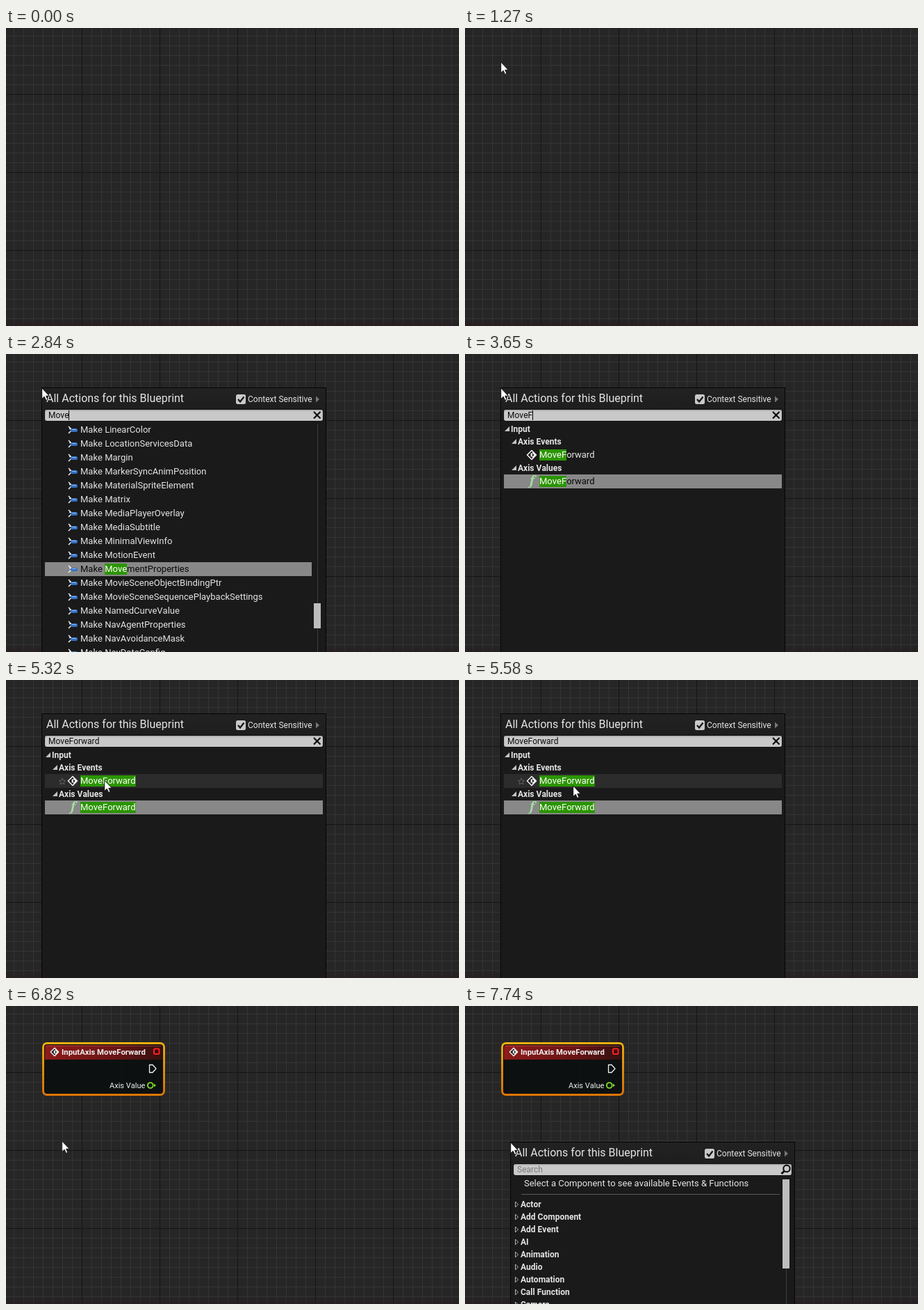
Recreate the animation shown at these times as an HTML page without scripts. Size 652 by 428 pixels, loop 8 s.

```html
<!DOCTYPE html>
<html lang="en">
<head>
<meta charset="utf-8">
<title>Adding an input node</title>
<style>
html, body { margin: 0; width: 652px; height: 428px; overflow: hidden; }
body {
  position: relative;
  font: 13px/20px Roboto, sans-serif;
  font-kerning: none;
  color: #e4e4e4;
  white-space: pre;
  background:
    linear-gradient(transparent 417px, rgba(40, 26, 32, .55)),
    linear-gradient(#151515 1px, transparent 1px) 0 95px / 112px 112px,
    linear-gradient(90deg, #151515 1px, transparent 1px) 109px 0 / 112px 112px,
    linear-gradient(#343434 1px, transparent 1px) 0 11px / 14px 14px,
    linear-gradient(90deg, #343434 1px, transparent 1px) 11px 0 / 14px 14px,
    #262626;
}
div, svg, .at { position: absolute; left: 0; top: 0; }
svg { width: 652px; height: 600px; overflow: visible; }
p { margin: 0; position: relative; }
.bold { font-weight: 700; font-size: 12px; }
.small { font-size: 12px; }

/* menu */
.menu { width: 652px; height: 600px; animation: menu 8s step-end infinite; }
.panel {
  left: 51px; top: 48px; width: 408px; height: 430px;
  border: 1px solid #050505;
  background: linear-gradient(#222, #1e1e1e 30px, #1a1a1a 52px);
}
.field {
  left: 56px; top: 80px; width: 400px; height: 16px;
  border-radius: 3px; background: #c9c9c9;
  box-shadow: 0 0 0 1px #111, inset 0 1px 2px #999;
}
.start, .typed, .make, .found { width: 652px; height: 600px; }
.start { animation: start 8s step-end infinite; }
.typed { animation: typed 8s step-end infinite; }
.make { animation: make 8s step-end infinite; }
.found { animation: found 8s step-end infinite; }
.cats { left: 66px; top: 129px; line-height: 18px; }
.rows { left: 56px; top: 99px; width: 333px; padding-left: 51px; }
.rows .sel { margin-left: -51px; padding-left: 51px; background: #888; color: #080808; }
.sel.wide, .hover { left: 56px; top: 173px; width: 400px; height: 20px; background: #888; }
.hover { top: 135px; background: #2c2c2c; animation: hover 8s step-end infinite; }
.word { position: relative; }

/* typed text: one set of widths in em drives the field and the match marks */
.input, .hit {
  position: absolute; left: 0; top: 0; height: 20px;
  overflow: hidden; font-style: normal;
  animation: type 8s step-end infinite;
}
.input {
  left: 61px; top: 81px; height: 14px; line-height: 14px;
  font-size: 12px; color: #0a0a0a; border-right: 1px solid #000;
  animation-name: type, blink;
}
.hit { background: #2b9500; color: #fff; clip-path: inset(2px 0 2px); }
.hit.mo { animation-name: type, mo; }
.hit.mov { animation-name: type, mov; }
mark { background: #2b9500; color: #fff; animation: mark 8s step-end infinite; }

.node { transform-origin: 140px 90px; animation: spawn 8s ease-out infinite; }
.node text { fill: #f0f0f0; }
.cursor { width: 12px; height: 19px; animation: show 8s step-end infinite, move 8s linear infinite; }

@keyframes menu {
  0%, 72.875% { opacity: 0; transform: none; }
  22.875% { opacity: 1; transform: none; }
  96.75% { opacity: 1; transform: translate(14px, 147px); }
}
@keyframes start { 0%, 96.75% { opacity: 1; } 31.75% { opacity: 0; } }
@keyframes typed { 0%, 96.75% { opacity: 0; } 31.75% { opacity: 1; } }
@keyframes make { 0%, 44.5% { opacity: 0; } 31.75% { opacity: 1; } }
@keyframes found { 0%, 96.75% { opacity: 0; } 44.5% { opacity: 1; } }
@keyframes hover { 0% { opacity: 0; } 66.25% { opacity: 1; } }
@keyframes mark {
  0% { background: #2b9500; color: #fff; }
  33.375% { background: transparent; color: inherit; }
}
@keyframes mo { 0% { opacity: 1; } 34.375% { opacity: 0; } }
@keyframes mov { 0% { opacity: 1; } 35.5% { opacity: 0; } }
@keyframes blink {
  0%, 44.5% { border-color: #000; }
  39%, 60.75% { border-color: transparent; }
}
@keyframes type {
  0% { width: 0; }
  31.75% { width: .873em; }
  33.375% { width: 1.443em; }
  34.375% { width: 1.928em; }
  35.5% { width: 2.458em; }
  44.5% { width: 3.011em; }
  47.875% { width: 3.581em; }
  49.375% { width: 3.919em; }
  51.625% { width: 4.67em; }
  53.25% { width: 5.214em; }
  55% { width: 5.552em; }
  58.5% { width: 6.13em; }
}
@keyframes spawn {
  0%, 75.87% { opacity: 0; transform: scale(.3); }
  75.88% { opacity: .3; transform: scale(.4); }
  78.875%, 100% { opacity: 1; transform: none; }
}
@keyframes show { 0% { opacity: 0; } 10.5% { opacity: 1; } }
@keyframes move {
  0%, 10.5% { transform: translate(25px, 64px); }
  11.5%, 13.25% { transform: translate(68px, 60px); }
  15.875%, 64.7% { transform: translate(51px, 48px); }
  66.5% { transform: translate(141px, 143px); }
  69.75%, 83.2% { transform: translate(155px, 151px); }
  86%, 88.25% { transform: translate(53px, 208px); }
  90.625%, 100% { transform: translate(65px, 195px); }
}
</style>
</head>
<body>

<svg>
  <defs>
    <linearGradient id="rim" x2="0" y2="1">
      <stop stop-color="#f2b010"/><stop offset="1" stop-color="#dd7606"/>
    </linearGradient>
    <linearGradient id="head">
      <stop stop-color="#8e1b1b"/><stop offset=".6" stop-color="#6a1414"/><stop offset="1" stop-color="#331010"/>
    </linearGradient>
    <pattern id="pill" patternUnits="userSpaceOnUse" x="89" y="99" width="16" height="20">
      <path d="M1 5l4 4M1 15l4-4M2 8.500h3" stroke="#eee" stroke-width="1.500"/>
      <rect x="4" y="8" width="10" height="5" rx="2.500" fill="#3472c6"/>
      <path d="M6 9.500h6" stroke="#8fb9f0"/>
    </pattern>
    <pattern id="fold" patternUnits="userSpaceOnUse" x="57" y="129" width="8" height="18">
      <path d="M1.500 5v8l4-4z" fill="none" stroke="#b4b4b4"/>
    </pattern>
    <g id="event">
      <path d="M0-6.500L6.500 0 0 6.500-6.500 0z" fill="#111" stroke="#f2f2f2" stroke-width="1.600" stroke-linejoin="round"/>
      <path d="M1-5L6 0 1 5V2.500H-1.500v-5H1z" fill="#f2f2f2"/>
      <path d="M1-2.500L3.500 0 1 2.500z" fill="#111"/>
    </g>
    <path id="open" d="M7 0v7H0z" fill="#c4c4c4"/>
  </defs>

  <g class="node">
    <rect x="55" y="55" width="171" height="72" rx="5" fill="#0c0f0f" fill-opacity=".9"/>
    <path d="M56 77V60q0-4 4-4h161q4 0 4 4v17z" fill="url(#head)"/>
    <path d="M58 57.500h165" stroke="#c06060" stroke-opacity=".5"/>
    <rect x="53.500" y="53.500" width="174" height="74" rx="5.500" fill="none" stroke="url(#rim)" stroke-width="2.800"/>
    <use href="#event" transform="translate(70 66) scale(.88)"/>
    <text x="80" y="70" font-size="11.300" font-weight="700">InputAxis MoveForward</text>
    <rect x="213" y="61.500" width="7.500" height="7.500" rx="1.500" fill="#3a0808" stroke="#ff2020" stroke-width="2"/>
    <path d="M206.500 84.500h4.500l5 5.500-5 5.500h-4.500z" fill="none" stroke="#f0f0f0" stroke-width="1.300" stroke-linejoin="round"/>
    <text x="149" y="118" font-size="11">Axis Value</text>
    <circle cx="207.800" cy="114" r="3.900" fill="#0c0f0f" stroke="#7fdc28" stroke-width="1.900"/>
    <path d="M213 111.500l3 2.500-3 2.500z" fill="#7fdc28"/>
  </g>
</svg>

<div class="menu">
  <div class="panel"></div>
  <span class="at" style="left:58px;top:54px;font-size:16px">All Actions for this Blueprint</span>
  <span class="at small" style="left:348px;top:55px">Context Sensitive</span>
  <div class="field"></div>
  <svg>
    <rect x="331" y="58" width="14" height="14" rx="2.500" fill="#c9c9c9"/>
    <path d="M334 65l3 3.500 5.500-7" fill="none" stroke="#151515" stroke-width="2.200"/>
    <path d="M446 60.500v9l5-4.500z" fill="#777"/>
  </svg>

  <div class="start">
    <span class="at small" style="left:61px;top:78px;color:#7c7c7c">Search</span>
    <span class="at" style="left:71px;top:98px">Select a Component to see available Events &amp; Functions</span>
    <svg>
      <circle cx="449" cy="86.500" r="4.700" fill="none" stroke="#080808" stroke-width="2"/>
      <path d="M445.500 90l-4 4" stroke="#080808" stroke-width="2.800"/>
      <path d="M67 123.500h372" stroke="#585858"/>
      <path d="M448.500 101v380" stroke="#3c3c3c"/>
      <rect x="443" y="102" width="10" height="128" fill="#bdbdbd"/>
      <rect x="57" y="129" width="8" height="162" fill="url(#fold)"/>
    </svg>
    <div class="cats bold"><p>Actor</p><p>Add Component</p><p>Add Event</p><p>AI</p><p>Animation</p><p>Audio</p><p>Automation</p><p>Call Function</p><p>Camera</p></div>
  </div>

  <div class="typed">
    <span class="input">MoveForward</span>
    <svg><path d="M443 83l9.500 9.500M452.500 83l-9.500 9.500" stroke="#080808" stroke-width="2.200"/></svg>
  </div>

  <div class="make">
    <div class="rows"><p><mark>M</mark>ake LinearColor</p><p><mark>M</mark>ake LocationServicesData</p><p><mark>M</mark>ake <mark>M</mark>argin</p><p><mark>M</mark>ake <mark>M</mark>arkerSyncAni<mark>m</mark>Position</p><p><mark>M</mark>ake <mark>M</mark>aterialSpriteEle<mark>m</mark>ent</p><p><mark>M</mark>ake <mark>M</mark>atrix</p><p><mark>M</mark>ake <mark>M</mark>ediaPlayerOverlay</p><p><mark>M</mark>ake <mark>M</mark>ediaSubtitle</p><p><mark>M</mark>ake <mark>M</mark>ini<mark>m</mark>alViewInfo</p><p><mark>M</mark>ake <span class="word">MotionEvent<i class="hit mo" style="top:-2px">Mo</i></span></p><p class="sel"><mark>M</mark>ake <span class="word">Move<mark>m</mark>entProperties<i class="hit" style="top:-2px">Move</i></span></p><p><mark>M</mark>ake <span class="word">MovieSceneObjectBindingPtr<i class="hit mov" style="top:-2px">Mov</i></span></p><p><mark>M</mark>ake <span class="word">MovieSceneSequencePlaybackSettings<i class="hit mov" style="top:-2px">Mov</i></span></p><p><mark>M</mark>ake Na<mark>m</mark>edCurveValue</p><p><mark>M</mark>ake NavAgentProperties</p><p><mark>M</mark>ake NavAvoidance<mark>M</mark>ask</p><p><mark>M</mark>ake NavDataConfig</p></div>
    <svg>
      <rect x="89" y="99" width="16" height="340" fill="url(#pill)"/>
      <path d="M448.500 101v330" stroke="#3c3c3c"/>
      <rect x="443" y="358" width="10" height="36" fill="#bdbdbd"/>
    </svg>
  </div>

  <div class="found">
    <div class="hover"><svg><path d="M25 6l1.300 3.200 3.400.3-2.600 2.200.8 3.300-2.900-1.800-2.900 1.800.8-3.300-2.600-2.200 3.400-.3z" fill="none" stroke="#626262"/></svg></div>
    <div class="sel wide"></div>
    <span class="at bold" style="left:66px;top:98px">Input</span>
    <span class="at bold" style="left:76px;top:116px">Axis Events</span>
    <span class="at bold" style="left:76px;top:154px">Axis Values</span>
    <span class="at" style="left:107px;top:135px">MoveForward<i class="hit">MoveForward</i></span>
    <span class="at" style="left:107px;top:173px;color:#080808">MoveForward<i class="hit">MoveForward</i></span>
    <svg>
      <use href="#open" x="57" y="104"/>
      <use href="#open" x="67" y="122"/>
      <use href="#open" x="67" y="160"/>
      <use href="#event" x="96" y="145"/>
      <text x="93" y="188" font-family="Noto Serif, serif" font-size="18" font-style="italic" font-weight="700" fill="#a4dfa0">f</text>
    </svg>
  </div>
</div>

<svg class="cursor"><path d="M.7.9v15.600l3.500-3.300 2.400 5.300 2.400-1-2.300-5.200h4.700z" fill="#fff" stroke="#0a0a0a" stroke-width=".9"/></svg>

</body>
</html>
```
